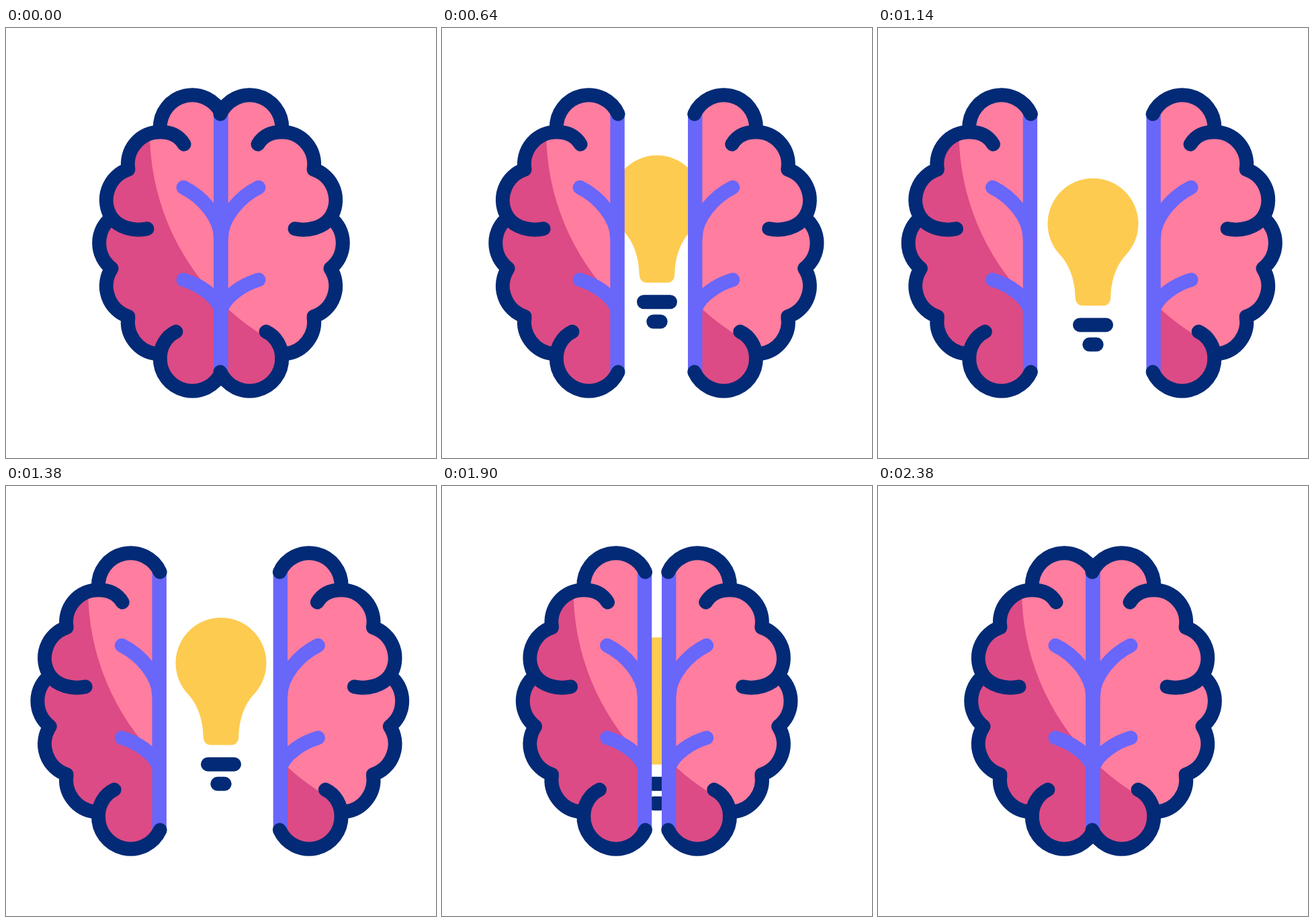
Animation of 640 by 640 pixels, one loop 2400 ms. Source, as an HTML page with a canvas:

```html
<!DOCTYPE html>
<html lang="en">
<head>
<meta charset="utf-8">
<title>Bright idea</title>
<style>
  html, body { margin: 0; width: 100%; height: 100%; overflow: hidden; background: #fff; }
  canvas { display: block; width: 640px; height: 640px; }
</style>
</head>
<body>
<canvas id="stage" width="640" height="640"></canvas>
<script>
const ctx = document.getElementById('stage').getContext('2d');
const LOOP = 2400;
const LINE = 21;
const PINK = '#ff7d9f', SHADE = '#dc4b85', NAVY = '#032a76', PURPLE = '#6966fa', YELLOW = '#fdcb50';

// The left half in its closed position; the right half is its mirror image.
// Every lobe is an arc of radius 48.
const shapes = {
  body: 'M321 128A48 48 0 0 0 229.3 149.3V154.7A48 48 0 0 0 182 210.5A48 48 0 0 0 157.1 282.2' +
        'A48 48 0 0 0 157.1 357.8A48 48 0 0 0 182 429.5A48 48 0 0 0 224 485L229.3 490.7A48 48 0 0 0 321 512Z',
  outline: 'M321 128A48 48 0 0 0 229.3 149.3' +
           'M265 173C258 161 246 154.7 229.3 154.7A48 48 0 0 0 182 210.5A48 48 0 0 0 157.1 282.2C168 297 190 303 210 298.8' +
           'M157.1 282.2A48 48 0 0 0 157.1 357.8A48 48 0 0 0 182 429.5A48 48 0 0 0 224 485' +
           'M253 452C238 459 229.3 475 229.3 490.7A48 48 0 0 0 321 512',
  branches: 'M264 237.3C292 251 319.5 282 319.5 312M264 374.8C288 382 313 399 319.5 418',
  bar: 'M309.3 128H330.7V512H309.3Z'
};

function makeHalf(matrix) {
  const half = {};
  for (const name in shapes) {
    half[name] = new Path2D();
    half[name].addPath(new Path2D(shapes[name]), matrix);
  }
  return half;
}
const leftHalf = makeHalf(new DOMMatrix());
const rightHalf = makeHalf(new DOMMatrix([-1, 0, 0, 1, 640, 0]));

// Everything outside one large circle lies in shade.
const shade = new Path2D('M0 0H640V640H0Z');
shade.arc(570, 155, 356, 0, Math.PI * 2);

// Origin at the top centre of the glass.
const glass = new Path2D('M-48.5 114.5A67.5 67.5 0 1 1 48.5 114.5C37 127 27 148 26.3 177' +
  'C26 185 22 189.5 15 189.5H-15C-22 189.5 -26 185 -26.3 177C-27 148 -37 127 -48.5 114.5Z');

// Symmetric cubic-bezier(a, 0, 1 - a, 1).
function ease(x, a) {
  if (x <= 0) return 0;
  if (x >= 1) return 1;
  let lo = 0, hi = 1;
  for (let i = 0; i < 24; i++) {
    const s = (lo + hi) / 2, r = 1 - s;
    if (3 * a * s * r * r + 3 * (1 - a) * s * s * r + s ** 3 < x) lo = s; else hi = s;
  }
  return lo * lo * (3 - 2 * lo);
}

function opening(t) {
  return t < 1170 ? ease(t / 1200, 0.75) : 1 - ease((t - 1170) / 1225, 0.785);
}

// Turning points of the floating bulb: [time, y of its top].
const floatKeys = [[0, 212], [250, 236], [650, 189.5], [970, 236.3], [1430, 194.8], [1790, 231.5], [2200, 194], [2400, 212]];

function bulbTop(t) {
  const i = floatKeys.findIndex(key => t < key[0]);
  const [t0, y0] = floatKeys[i - 1], [t1, y1] = floatKeys[i];
  return y0 + (y1 - y0) * (1 - Math.cos(Math.PI * (t - t0) / (t1 - t0))) / 2;
}

function pill(y, halfWidth) {
  ctx.beginPath();
  ctx.roundRect(-halfWidth, y, halfWidth * 2, LINE, LINE / 2);
  ctx.fill();
}

function drawBulb(top) {
  ctx.save();
  ctx.translate(320, top);
  ctx.fillStyle = YELLOW;
  ctx.fill(glass);
  ctx.fillStyle = NAVY;
  pill(207.7, 30);
  pill(236.9, 15.7);
  ctx.restore();
}

function drawHalf(half, shift) {
  ctx.save();
  ctx.translate(shift, 0);

  ctx.save();
  ctx.clip(half.body);
  ctx.fillStyle = PINK;
  ctx.fillRect(0, 0, 640, 640);
  ctx.fillStyle = SHADE;
  ctx.fill(shade, 'evenodd');
  ctx.restore();

  ctx.fillStyle = ctx.strokeStyle = PURPLE;
  ctx.fill(half.bar);
  ctx.stroke(half.branches);
  ctx.strokeStyle = NAVY;
  ctx.stroke(half.outline);
  ctx.restore();
}

function draw(t) {
  ctx.fillStyle = '#fff';
  ctx.fillRect(0, 0, 640, 640);
  ctx.lineWidth = LINE;
  ctx.lineCap = ctx.lineJoin = 'round';
  const open = opening(t);
  drawBulb(bulbTop(t));
  drawHalf(leftHalf, -93.7 * open);
  drawHalf(rightHalf, 90.2 * open);
}

const start = performance.now();
function tick() {
  draw((performance.now() - start) % LOOP);
  requestAnimationFrame(tick);
}
tick();
</script>
</body>
</html>
```
